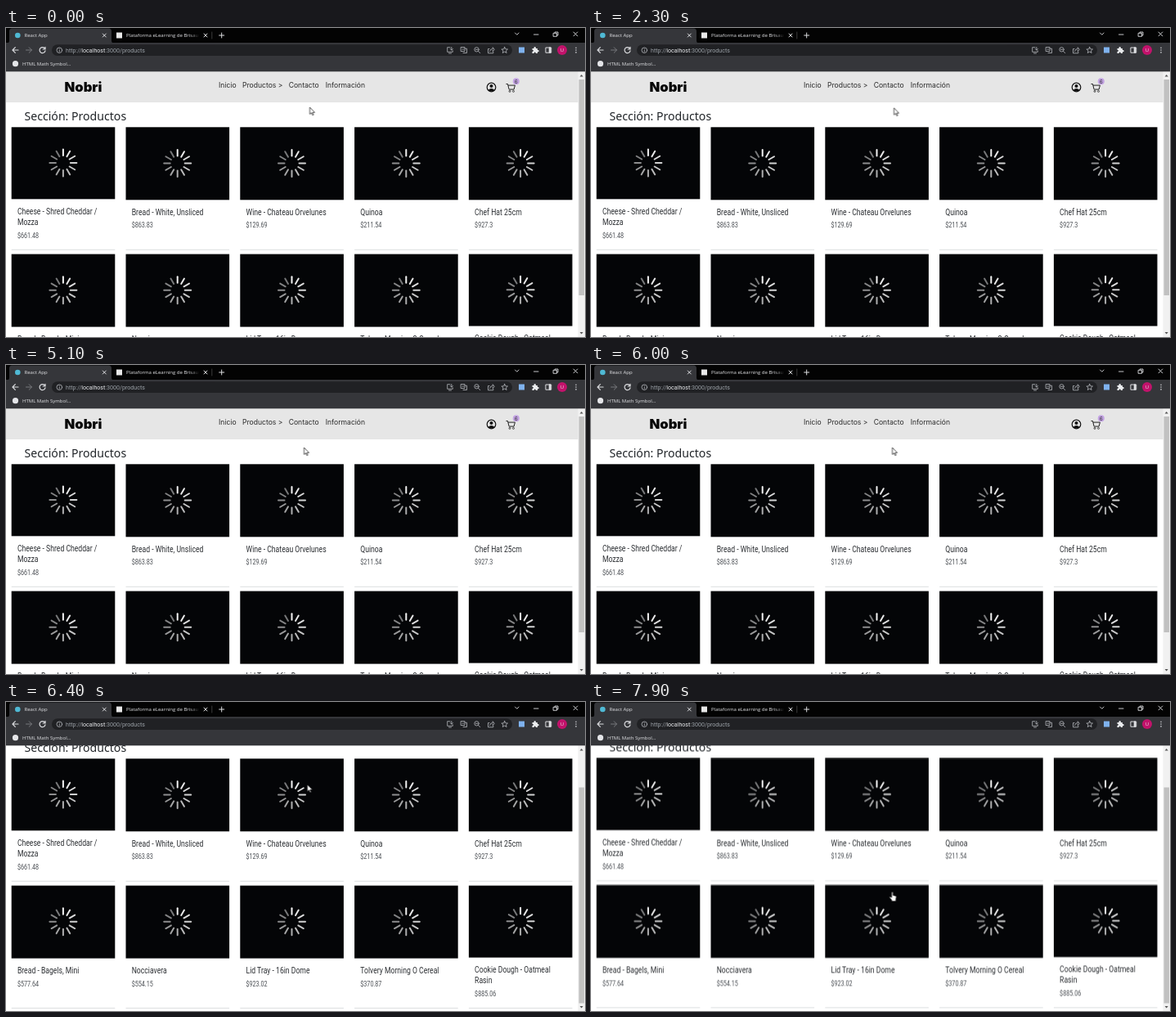
An HTML page that plays this animation: 708x378 px, repeating every 8 s.

```html
<!DOCTYPE html>
<html lang="es">
<head>
<meta charset="utf-8">
<title>Productos</title>
<style>
  html, body { margin: 0; width: 100%; height: 100%; overflow: hidden; background: #fff; }
  svg { display: block; width: 100vw; height: 100vh; }
  .line { fill: none; stroke: #dcdde0; stroke-linecap: round; stroke-linejoin: round; }
  .ui { font: 6px "Open Sans", sans-serif; fill: #e4e5e8; }
  .url { font: 7.1px Roboto, sans-serif; fill: #9aa0a6; }
  .brand { font: 900 16.6px Inter, sans-serif; fill: #080808; }
  .nav { font: 8.6px Inter, sans-serif; fill: #2b2b2b; }
  .heading { font: 500 14.1px "Noto Sans", sans-serif; fill: #212529; }
  .title { font: 10.8px Roboto, sans-serif; fill: #2c2f33; }
  .price { font: 9px Roboto, sans-serif; fill: #4b4f54; }

  #page, #thumb, #cursor, #underline, #arrow, #hand { animation: 8s step-end infinite; }
  #page { animation-name: scroll; }
  #thumb { animation-name: thumb; }
  #cursor { animation-name: move; }
  #arrow { animation-name: arrow; }
  #hand { animation-name: hand; }
  #underline { animation-name: underline; }

  @keyframes scroll {
    0% { transform: none; }
    78.75% { transform: translateY(-19px); }
    80% { transform: translateY(-52px); }
    81.25%, 100% { transform: translateY(-52.6px); }
  }
  @keyframes thumb {
    0% { transform: none; }
    78.75% { transform: translateY(15px); }
    80%, 100% { transform: translateY(41.5px); }
  }
  @keyframes move {
    0% { transform: translate(371.5px, 97px); }
    28.75% { transform: translate(370.5px, 97.7px); }
    37.5% { transform: translate(399px, 96px); }
    38.75% { transform: translate(426px, 90px); }
    41.25% { transform: translate(417px, 80px); }
    42.5% { transform: translate(404px, 69px); }
    43.75% { transform: translate(396px, 88px); }
    45% { transform: translate(390.8px, 100.3px); }
    46.25% { transform: translate(386px, 105px); }
    47.5% { transform: translate(382px, 107.5px); }
    50% { transform: translate(379px, 106px); }
    51.25% { transform: translate(374px, 104px); }
    52.5% { transform: translate(369px, 102px); }
    53.75% { transform: translate(366px, 101px); }
    63.75% { transform: translate(364.5px, 101px); }
    70% { transform: translate(368.5px, 101px); }
    90% { transform: translate(368.5px, 105px); }
    91.25% { transform: translate(368.5px, 119px); }
    92.5% { transform: translate(368.5px, 142px); }
    93.75% { transform: translate(368.5px, 168px); }
    95% { transform: translate(368.5px, 193px); }
    96.25% { transform: translate(368.5px, 213px); }
    97.5% { transform: translate(368.5px, 226px); }
    98.75%, 100% { transform: translate(368.5px, 232px); }
  }
  @keyframes arrow {
    0%, 43.75% { opacity: 1; }
    42.5% { opacity: 0; }
    90%, 100% { opacity: 0; }
  }
  @keyframes hand {
    0%, 43.75% { opacity: 0; }
    42.5% { opacity: 1; }
    90%, 100% { opacity: 1; }
  }
  @keyframes underline {
    0% { width: 0; }
    42.5% { width: 13px; }
    43.75% { width: 21px; }
    45% { width: 11.5px; }
    46.25% { width: 3px; }
    47.5%, 100% { width: 0; }
  }
</style>
</head>
<body>
<svg viewBox="0 0 708 378" preserveAspectRatio="none">
  <defs><g id="spinner"></g></defs>
  <rect width="708" height="378" fill="#fff"/>

  <g id="page">
    <rect y="53" width="700" height="38" fill="#e6e6e6"/>
    <text class="brand" x="71.5" y="77.5">Nobri</text>
    <g class="nav">
      <text x="260" y="73.4">Inicio</text>
      <text x="289" y="73.4">Productos &gt;</text>
      <text x="345.7" y="73.4">Contacto</text>
      <text x="390.7" y="73.4">Información</text>
    </g>
    <rect id="underline" x="391" y="75.6" width="0" height="1.2" fill="#a866d4"/>
    <!-- account and cart -->
    <circle cx="593.5" cy="72.5" r="5.3" fill="none" stroke="#111" stroke-width="1.2"/>
    <circle cx="593.5" cy="71" r="2" fill="#111"/>
    <path d="M589.6 76q3.9-4 7.8 0l-2 1.6h-3.8z" fill="#111"/>
    <path d="M611.5 68.5h2l1.6 6.6h6l1.3-5h-8.5" fill="none" stroke="#222" stroke-width="1"/>
    <circle cx="616" cy="77.4" r="1" fill="none" stroke="#222" stroke-width=".8"/>
    <circle cx="620.5" cy="77.4" r="1" fill="none" stroke="#222" stroke-width=".8"/>
    <circle cx="623.8" cy="65.3" r="4" fill="#c3a3e3"/>
    <text class="nav" x="623.8" y="67.6" text-anchor="middle" style="font-size:6px">6</text>
    <text class="heading" x="22.5" y="113">Sección: Productos</text>
    <g id="cards"></g>
  </g>

  <!-- scrollbar -->
  <rect x="699.5" y="53" width="8.5" height="325" fill="#f1f1f1"/>
  <rect id="thumb" x="700.5" y="63" width="6.5" height="264" fill="#c1c1c1"/>
  <path d="M701.6 59.5l2.1-2.4 2.1 2.4zM701.6 372l2.1 2.4 2.1-2.4z" fill="#555"/>

  <!-- browser window -->
  <rect width="708" height="18.5" fill="#030303"/>
  <path d="M1 18.5q3 0 3-3V4q0-3.5 3.5-3.5h118q3.5 0 3.5 3.5v11.5q0 3 3 3z" fill="#35363a"/>
  <rect y="18" width="708" height="35.3" fill="#35363a"/>
  <rect x="56" y="20.3" width="563" height="13.6" rx="6.8" fill="#202124"/>
  <circle cx="14.3" cy="9" r="3.3" fill="#4fb9d4"/>
  <rect x="135" y="5.5" width="7" height="7" fill="#e8e8e8"/>
  <circle cx="11.5" cy="43.7" r="3.6" fill="#e4e5e8"/>
  <linearGradient id="fade" x1="0" x2="1"><stop stop-color="#030303" stop-opacity="0"/><stop offset="1" stop-color="#030303"/></linearGradient>
  <g class="ui">
    <text x="22.5" y="11.2">React App</text>
    <text x="147" y="11.2">Plataforma eLearning de Brisau</text>
    <text x="20" y="45.8">HTML Math Symbol...</text>
  </g>
  <rect x="224" y="2" width="13" height="14" fill="url(#fade)"/>
  <rect x="237" y="2" width="5" height="14" fill="#030303"/>
  <text class="url" x="73" y="29.6">http://<tspan fill="#e8eaed">localhost</tspan>:3000/products</text>

  <g class="line">
    <path d="M118.3 7l4 4m0-4l-4 4M242 7l4 4m0-4l-4 4M260.7 9h6m-3-3v6"/>
    <path d="M251.8 5v8" stroke="#555" stroke-width=".7"/>
    <path d="M622.5 6l2.3 2.3L627.100 6M645.500 8h5.500M694 5l4.800 4.800m0-4.800l-4.800 4.800M669.500 6.300h4v4h-4zM671 6V5h4v4h-1" stroke-width=".9"/>
    <path d="M15 27H8m3.300-3.300L8 27l3.300 3.300" stroke-width="1.200"/>
    <path d="M24.500 27h7m-3.300-3.300l3.300 3.300-3.300 3.300" stroke="#77797d"/>
    <path d="M47.600 25.300a3.500 3.500 0 1 0 .4 2.500M48 23.300v2.700h-2.700" stroke-width="1.200"/>
    <g stroke-width=".8" stroke="#b6b9be">
      <circle cx="65.300" cy="27.200" r="3.300"/><path d="M65.300 27v2M65.300 25.300v.1"/>
      <path d="M543 23.700h-3.300v5.600h6.600v-1.500M541.500 31h3M544.800 23.500v3.500m-1.600-1.500l1.600 1.600 1.600-1.600"/>
      <path d="M556.500 23.500h4.500v5h-4.500zM559 30.500h4.500v-5.300H561M558 26h1.500"/>
      <circle cx="575.500" cy="26.300" r="2.700"/><path d="M577.500 28.400l2.300 2.300M574.300 26.300h2.400"/>
      <path d="M591 25.500h-1.500v5.300h6.300v-1.500M591.500 28.500q.5-3 3.700-3v-1.800l2 2.600-2 2.400v-1.600"/>
      <path d="M609.700 23.300l1.100 2.500 2.700.2-2.100 1.800.7 2.700-2.400-1.500-2.400 1.500.7-2.700-2.100-1.800 2.700-.2z"/>
    </g>
    <path d="M660.300 24h6.400v6.200h-6.400z"/><path d="M665 24.500v5" stroke-width="2.500"/>
  </g>
  <rect x="627" y="23.500" width="7" height="7" fill="#7fb2ee"/>
  <path d="M643.500 25h2q-.5-2 1.200-2t1.200 2h2v2q1.800-.4 1.800 1.100t-1.800 1.200v1.700h-2q0-1.500-1.200-1.500t-1.200 1.500h-2v-2.100q1.400 0 1.400-1.100t-1.400-1z" fill="#eceef0"/>
  <circle cx="680" cy="27" r="6" fill="#c2126b"/>
  <text class="ui" x="680" y="29.200" text-anchor="middle">U</text>
  <path d="M697 24.200v.1m0 2.700v.1m0 2.700v.1" class="line" stroke-width="1.500"/>

  <g id="cursor" fill="#fff" stroke="#111" stroke-width=".7" stroke-linejoin="round">
    <path id="arrow" d="M0 0V8.500L2 6.700 3.400 9.800 4.600 9.200 3.300 6.300H6Z"/>
    <path id="hand" d="M-.9 1q.9-1.600 1.800 0v3.500l3 .7q1 .3 1 1.300L4.200 10v1.800H-.8V10.500L-3.400 7q.2-1.300 1.400-.7L-.9 7.300Z"/>
  </g>
</svg>

<script>
  const products = [
    ["Cheese - Shred Cheddar /|Mozza", "661.48"],
    ["Bread - White, Unsliced", "863.83"],
    ["Wine - Chateau Orvelunes", "129.69"],
    ["Quinoa", "211.54"],
    ["Chef Hat 25cm", "927.3"],
    ["Bread - Bagels, Mini", "577.64"],
    ["Nocciavera", "554.15"],
    ["Lid Tray - 16in Dome", "923.02"],
    ["Tolvery Morning O Cereal", "370.87"],
    ["Cookie Dough - Oatmeal|Rasin", "885.06"]
  ];

  const spoke = (_, i) =>
    `<path d="M0-9V-16.500" transform="rotate(${i * 30})" stroke="#fff" stroke-width="2"
      stroke-linecap="round" opacity="${0.95 - i * 0.045}"/>`;

  // Condensed lettering shared by every card
  const label = (kind, y, text) =>
    `<text class="${kind}" transform="translate(7.200 ${y}) scale(.8 1)">${text}</text>`;

  function card([name, price], i) {
    const x = 6.7 + (i % 5) * 139.8;
    const y = 121.3 + Math.floor(i / 5) * 155.3;
    const lines = name.split("|");
    const wrapped = lines.length > 1;
    const height = wrapped ? 88 : 89;
    const first = wrapped ? 106.5 : 107.8;
    const priceY = wrapped ? 135.5 : 122.9;
    return `<g transform="translate(${x} ${y})">
      <rect width="126.600" height="${height}" fill="#040507"/>
      <use href="#spinner" x="63.200" y="${height / 2 - 0.3}"/>
      ${lines.map((text, n) => label("title", first + n * 13.2, text)).join("")}
      ${label("price", priceY, "$" + price)}
      <rect y="149.500" width="126.600" height=".8" fill="#d3d6d8"/>
    </g>`;
  }

  document.getElementById("spinner").innerHTML = Array.from({ length: 12 }, spoke).join("");
  document.getElementById("cards").innerHTML = products.map(card).join("");
</script>
</body>
</html>
```
